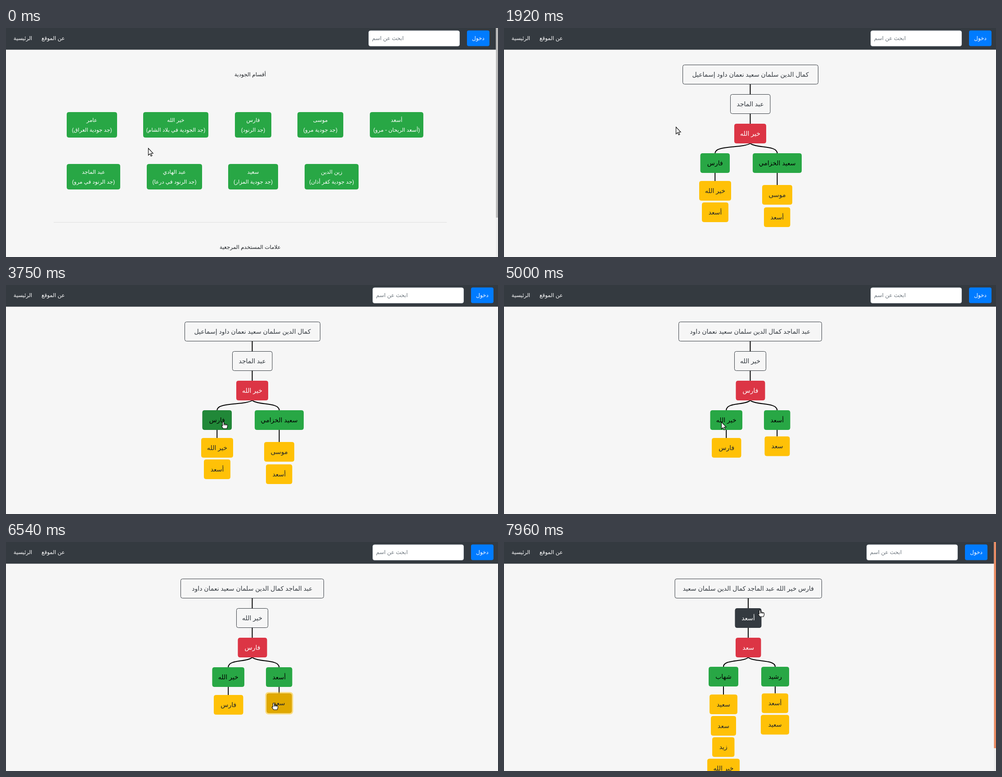
An HTML page for the animation above (8 s loop, 1094 px wide and 512 px high).

```html
<!DOCTYPE html>
<html lang="ar">
<head>
<meta charset="utf-8">
<style>
html, body { margin: 0; width: 100%; height: 100%; overflow: hidden; background: #f6f6f6; }
svg { display: block; direction: rtl; }
text { font-family: "Liberation Sans", "DejaVu Sans", sans-serif; text-anchor: middle; }
</style>
</head>
<body>
<svg id="stage" width="1094" height="512" viewBox="0 0 1094 512"></svg>
<script>
const LOOP = 8000;
const stage = document.getElementById('stage');

// fill, hover fill, border, hover border, text, hover text
const STYLES = {
  outline: ['#f6f6f6', '#343a40', '#343a40', '#343a40', '#343a40', '#fff'],
  red: ['#dc3545', '#c82333', '#dc3545', '#bd2130', '#fff', '#fff'],
  green: ['#28a745', '#218838', '#28a745', '#1e7e34', '#000', '#000'],
  yellow: ['#ffc107', '#e0a800', '#ffc107', '#d39e00', '#212529', '#212529'],
  card: ['#28a745', '#218838', '#28a745', '#1e7e34', '#fff', '#fff']
};

// left, right, top, name, note
const CARDS = [
  [135, 247, 188, 'عامر', '(جد جودية العراق)'],
  [305, 450, 188, 'خير الله', '(جد الجودية في بلاد الشام)'],
  [509, 590, 188, 'فارس', '(جد الرنود)'],
  [648, 750, 188, 'موسى', '(جد جودية مرو)'],
  [809, 928, 188, 'أسعد', '(أسعد الريحان - مرو)'],
  [135, 254, 304, 'عبد الماجد', '(جد الرنود في مرو)'],
  [313, 436, 304, 'عبد الهادي', '(جد الرنود في درعا)'],
  [494, 605, 304, 'سعيد', '(جد جودية المزار)'],
  [664, 784, 304, 'زين الدين', '(جد جودية كفر أذان)']
];

// trunk: left, right, name; branches: top-down boxes of left, right, top, name
const TREES = [
  {
    x: 547.5,
    trunk: [[397, 699, 'كمال الدين سلمان سعيد نعمان داود إسماعيل'], [503, 592.5, 'عبد الماجد'], [512, 583, 'خير الله']],
    branches: [
      [[436.5, 502, 280, 'فارس'], [434, 505, 342, 'خير الله'], [440, 499, 390, 'أسعد']],
      [[553, 662, 280, 'سعيد الخزامي'], [574, 641, 351, 'موسى'], [578, 636.5, 401, 'أسعد']]
    ]
  },
  {
    x: 547.5,
    trunk: [[388, 707, 'عبد الماجد كمال الدين سلمان سعيد نعمان داود'], [512, 583, 'خير الله'], [515.5, 580.5, 'فارس']],
    branches: [
      [[458.5, 530, 280, 'خير الله'], [462, 527.5, 342, 'فارس']],
      [[578, 636.5, 280, 'أسعد'], [579.5, 635.5, 338.5, 'سعد']]
    ]
  },
  {
    x: 543,
    trunk: [[379.5, 707, 'فارس خير الله عبد الماجد كمال الدين سلمان سعيد'], [513.5, 572.5, 'أسعد'], [515, 571.5, 'سعد']],
    branches: [
      [[455, 521, 279, 'شهاب'], [457, 519, 341, 'سعيد'], [460, 516, 389, 'سعد'], [463, 512.5, 436.5, 'زيد'], [452, 524, 484.5, 'خير الله']],
      [[572, 634, 279, 'رشيد'], [573, 632, 338.5, 'أسعد'], [571, 634, 386.5, 'سعيد']]
    ]
  }
];

// time, x, y, pointing hand
const MOVES = [
  [830, 382, 221, 1], [1920, 382, 221, 0], [2830, 384, 227, 0], [3000, 408, 240, 0],
  [3170, 422, 254, 0], [3330, 436, 272, 0], [3580, 484, 307, 1], [3750, 483, 306, 1],
  [5000, 483, 306, 0], [5460, 484, 306, 1], [5630, 510, 317, 1], [6080, 595, 360, 1],
  [6710, 595, 360, 0], [6920, 595, 360, 1], [7460, 596, 366, 1], [7630, 590, 254, 0],
  [7960, 569, 152, 1]
];

// start, end, box id, hover strength, focus ring colour
const HOVERS = [
  [3580, 4580, '0/0/0', 1], [4580, 5000, '0/0/0', 1, '#28a745'],
  [5130, 6080, '1/0/0', 1],
  [6080, 6380, '1/1/1', 1], [6380, 6710, '1/1/1', 1, '#ffc107'],
  [6920, 7630, '2/1/1', 1],
  [7630, 7960, '2/1/1', .4], [7630, 7960, '2/1/0', .4],
  [7960, LOOP, '2/t/1', 1]
];

const within = (t, a, b) => t >= a && t < b;
const clamp = v => Math.max(0, Math.min(1, v));
const smooth = v => v * v * (3 - 2 * v);
const rect = (x, y, w, h, fill, extra = '') =>
  `<rect x="${x}" y="${y}" width="${w}" height="${h}" fill="${fill}" ${extra}/>`;
const label = (x, y, s, size, fill) =>
  `<text x="${x}" y="${y}" font-size="${size}" fill="${fill}">${s}</text>`;
const line = d => `<path d="${d}" fill="none" stroke="#000" stroke-width="2"/>`;
const blend = (a, b, k) => k <= 0 ? a : k >= 1 ? b : `color-mix(in srgb, ${b} ${(k * 100).toFixed(1)}%, ${a})`;

function button(l, r, y, h, kind, hover = 0, ring) {
  const [a, b, c, d] = STYLES[kind];
  const halo = ring ? rect(l - 3, y - 3, r - l + 6, h + 6, ring, 'rx="7" opacity=".5"') : '';
  return halo + rect(l + .5, y + .5, r - l - 1, h - 1, blend(a, b, hover),
    `rx="4" stroke="${blend(c, d, hover)}"`);
}

function navbar(shift) {
  return rect(0, 0, 1094, 48.5, '#343a40') +
    label(37.5, 27, 'الرئيسية', 12, '#fff') +
    label(105, 27, 'عن الموقع', 12, '#fff') +
    rect(806.5 + shift, 6, 202, 34.5, '#fff', 'rx="4" stroke="#ced4da"') +
    label(849 + shift, 27, 'ابحث عن اسم', 12, '#6c757d') +
    rect(1025 + shift, 5.5, 50, 35, '#007bff', 'rx="4"') +
    label(1050 + shift, 27, 'دخول', 12, '#fff');
}

const scrollbar = (h, fill) => rect(1089.5, 0, 4.5, 512, '#ececec') + rect(1089.5, 0, 4.5, h, fill);

function home(hover) {
  return label(543, 108, 'أقسام الجودية', 12, '#212529') +
    CARDS.map(([l, r, y, name, note], i) => {
      const x = (l + r) / 2;
      return button(l, r, y, 57, 'card', i === 1 ? hover : 0) +
        label(x, y + 22, name, 12, '#fff') + label(x, y + 43.5, note, 12, '#fff');
    }).join('') +
    rect(106, 434, 874, 1, '#dedede') +
    label(543, 494, 'علامات المستخدم المرجعية', 12, '#212529');
}

function tree(n, t) {
  const { x, trunk, branches } = TREES[n];
  const node = (l, r, y, name, kind, id) => {
    const state = HOVERS.find(h => h[2] === `${n}/${id}` && within(t, h[0], h[1])) || [];
    const hover = state[3] || 0;
    return button(l, r, y, 44, kind, hover, state[4]) +
      label((l + r) / 2, y + 26.5, name, 14, STYLES[kind][hover === 1 ? 5 : 4]);
  };
  let out = line(`M${x} 125V148M${x} 191V214`);
  for (const [child, grandchild] of branches) {
    const cx = (child[0] + child[1]) / 2, y = child[2];
    const bend = x + (cx - x) * .22;
    out += line(`M${x} 258C${bend} 269 ${cx} 262 ${cx} ${y}M${cx} ${y + 43}V${grandchild[2]}`);
  }
  trunk.forEach(([l, r, name], i) => {
    out += node(l, r, 82 + 66 * i, name, i < 2 ? 'outline' : 'red', `t/${i}`);
  });
  branches.forEach((boxes, b) => boxes.forEach(([l, r, y, name], i) => {
    out += node(l, r, y, name, i ? 'yellow' : 'green', `${b}/${i}`);
  }));
  return out;
}

function cursor(t) {
  let x, y, hand;
  if (t < 830) {
    const k = smooth(clamp((t - 330) / 400));
    x = 316 + 66 * k;
    y = 268.5 - 47.5 * k;
    hand = y < 245;
  } else {
    [, x, y, hand] = MOVES.findLast(m => t >= m[0]);
  }
  const shape = hand
    ? '<path d="M-1.5 9V1.5Q-1.5 0 0 0T1.5 1.5V5Q3 4 4 5.5Q5.500 4.500 6.500 6Q9.500 5.500 9.500 8V11L8 15H0L-3.500 10Q-4 7.500-1.500 9Z"/><path d="M1.500 5V8M4 5.500V8M6.500 6V8.500" fill="none"/>'
    : '<path d="M.5.5V16L4 12.700 6.400 18 8.800 17 6.400 11.700H11Z"/>';
  return `<g transform="translate(${x} ${y})" fill="#fff" stroke="#000" stroke-width="1.1">${shape}</g>`;
}

function picture(t) {
  const status = within(t, 4580, 5000) || within(t, 6380, 6540)
    ? rect(-.5, 505.5, 152, 8, '#dee1e6', 'stroke="#c4c7cc"') : '';
  let page;
  if (t < 1920) page = navbar(0) + home(clamp((t - 530) / 150)) + scrollbar(424, '#b9b9b9');
  else if (t < 5000) page = navbar(9) + tree(0, t);
  else if (t < 6710) page = navbar(9) + tree(1, t);
  else page = navbar(0) + tree(2, t) + scrollbar(461, '#e98b63');
  return page + status + cursor(t);
}

const start = performance.now();
let shown;
function frame() {
  const next = picture((performance.now() - start) % LOOP);
  if (next !== shown) stage.innerHTML = shown = next;
  requestAnimationFrame(frame);
}
frame();
</script>
</body>
</html>
```
